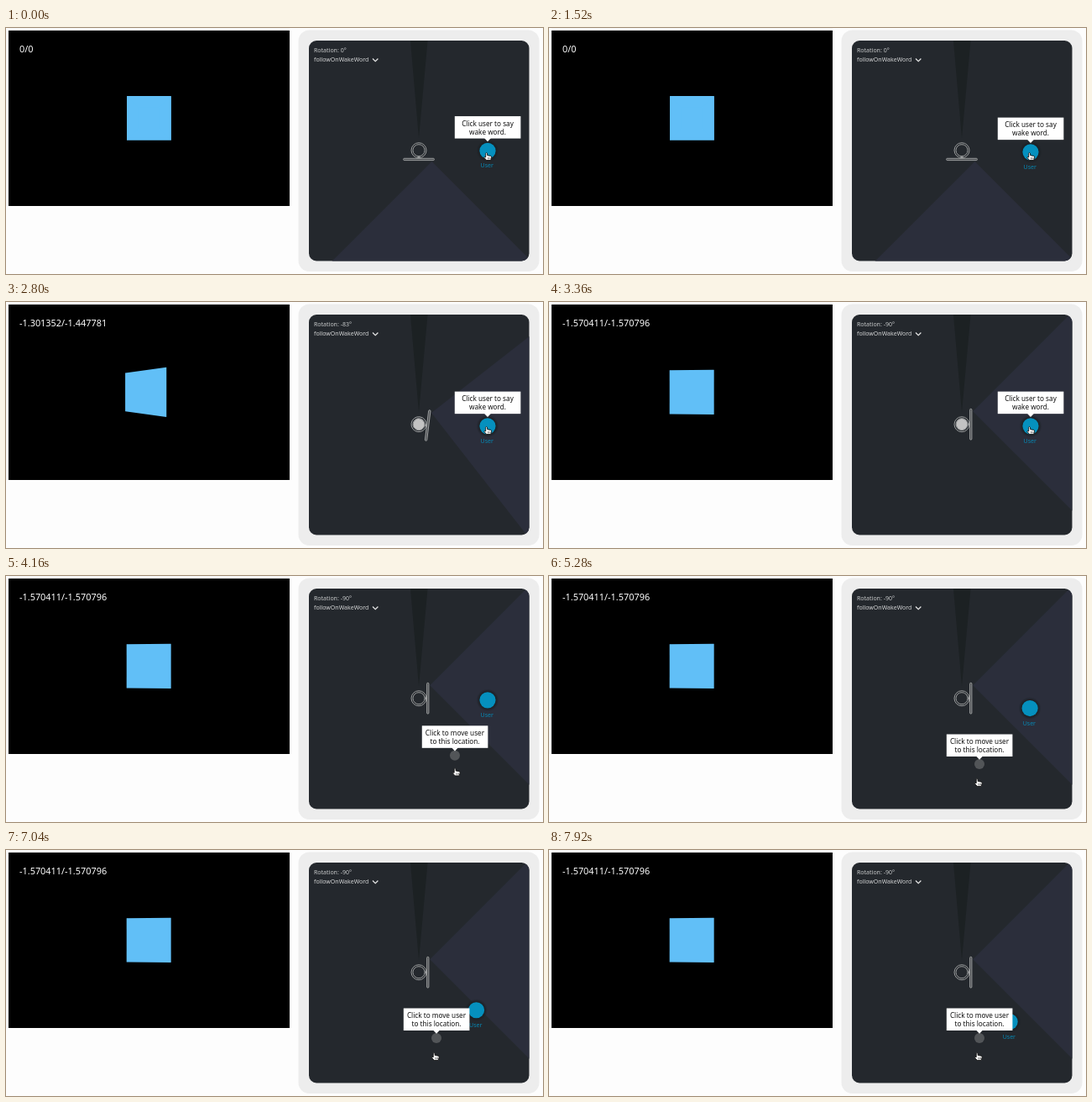
Write an HTML page with a canvas that moves like this. It is 640x293 px and loops after 8 s.

```html
<!DOCTYPE html>
<html>
<head>
<meta charset="utf-8">
<style>
  html, body { margin: 0; width: 100%; height: 100%; overflow: hidden; background: #fdfdfd; }
  canvas { display: block; width: 640px; height: 293px; }
</style>
</head>
<body>
<canvas id="stage"></canvas>
<script>
const LOOP = 8000;
const ROBOT = { x: 492, y: 145.7 };
const TURN = { start: 2015, speed: 0.00184196, lag: 79.5, end: Math.PI / 2 };
const ORBIT_RADIUS = 82;

const canvas = document.getElementById('stage');
const ctx = canvas.getContext('2d');
const ratio = window.devicePixelRatio || 1;
canvas.width = 640 * ratio;
canvas.height = 293 * ratio;

const clamp = (v, lo, hi) => Math.min(hi, Math.max(lo, v));

// Linear interpolation through [time, x, y] stops.
function along(stops, t) {
  if (t <= stops[0][0]) return { x: stops[0][1], y: stops[0][2] };
  for (let i = 1; i < stops.length; i++) {
    const [t0, x0, y0] = stops[i - 1], [t1, x1, y1] = stops[i];
    if (t <= t1) {
      const k = (t - t0) / (t1 - t0);
      return { x: x0 + (x1 - x0) * k, y: y0 + (y1 - y0) * k };
    }
  }
  const last = stops[stops.length - 1];
  return { x: last[1], y: last[2] };
}

function text(str, x, y, size, color, align = 'left') {
  ctx.font = `${size}px "Noto Sans", "Open Sans", sans-serif`;
  ctx.textAlign = align;
  ctx.fillStyle = color;
  ctx.fillText(str, x, y);
}

function roundRect(x, y, w, h, r) {
  ctx.beginPath();
  ctx.roundRect(x, y, w, h, r);
}

function polygon(points, color) {
  ctx.beginPath();
  points.forEach(([x, y]) => ctx.lineTo(x, y));
  ctx.closePath();
  ctx.fillStyle = color;
  ctx.fill();
}

function disc(x, y, r, color) {
  ctx.beginPath();
  ctx.arc(x, y, r, 0, 2 * Math.PI);
  ctx.fillStyle = color;
  ctx.fill();
}

// Robot heading, and the camera angle that follows it with a lag.
function headings(t) {
  const { start, speed, lag, end } = TURN;
  const elapsed = Math.max(0, t - start), duration = end / speed;
  const moving = Math.min(elapsed, duration);
  let gap = speed * lag * (1 - Math.exp(-moving / lag));
  if (elapsed > duration) gap = Math.max(0.000385, gap * Math.exp(-(elapsed - duration) / lag));
  const robot = speed * moving;
  return { robot, camera: robot - gap };
}

function drawView(angles) {
  ctx.fillStyle = '#000';
  ctx.fillRect(3, 3, 335, 209);

  const angle = Math.min(angles.camera, 1.55);
  const c = Math.cos(angle), s = Math.sin(angle);
  const project = ([x, y, z]) => {
    const scale = 52.6 / (3 - (z * c - x * s));
    return [170.4 + (x * c + z * s) * scale, 107.4 + y * scale];
  };
  const corners = [[-1, 1], [1, 1], [1, -1], [-1, -1]];
  corners.forEach(([x0, z0], i) => {
    const [x1, z1] = corners[(i + 1) % 4];
    polygon([[x0, -1, z0], [x1, -1, z1], [x1, 1, z1], [x0, 1, z0]].map(project), '#61bff7');
  });

  const show = v => v ? (-v).toFixed(6) : '0';
  text(`${show(angles.camera)}/${show(angles.robot)}`, 16, 29.3, 10.9, '#fff');
}

function drawRobot(angle, listening) {
  ctx.save();
  ctx.translate(ROBOT.x, ROBOT.y);
  ctx.rotate(-angle);
  ctx.strokeStyle = '#a5a7a8';
  ctx.lineWidth = 0.9;
  for (const r of [9, 7]) {
    ctx.beginPath();
    ctx.arc(0, 0, r, 0, 2 * Math.PI);
    ctx.stroke();
  }
  if (listening) disc(0, 0, 6.6, '#c3c3c3');
  ctx.fillStyle = '#a5a7a8';
  ctx.fillRect(-1.5, 7.5, 3, 2.3);
  roundRect(-18.4, 9.6, 36.8, 2.3, 1.1);
  ctx.fillStyle = '#4a4d50';
  ctx.fill();
  ctx.stroke();
  ctx.restore();
}

function drawTooltip(x, top, lines) {
  ctx.fillStyle = '#fff';
  ctx.fillRect(x - 39.2, top, 78.6, 26.5);
  polygon([[x - 4, top + 26], [x + 4, top + 26], [x, top + 30.3]], '#fff');
  lines.forEach((line, i) => text(line, x, top + 11.6 + i * 10.2, 8.2, '#111', 'center'));
}

function drawCursor({ x, y }) {
  ctx.save();
  ctx.translate(x, y);
  ctx.beginPath();
  ctx.moveTo(-2.8, -4);
  ctx.quadraticCurveTo(-1.9, -5.4, -1, -4);
  ctx.lineTo(-0.8, -1.5);
  ctx.lineTo(3.2, -0.8);
  ctx.quadraticCurveTo(4.4, -0.4, 4.2, 1);
  ctx.lineTo(3.2, 4.4);
  ctx.lineTo(-1.8, 4.4);
  ctx.lineTo(-4.6, 1.2);
  ctx.quadraticCurveTo(-4.8, -0.2, -2.8, 0.8);
  ctx.closePath();
  ctx.fillStyle = '#fff';
  ctx.strokeStyle = '#111';
  ctx.lineWidth = 0.9;
  ctx.fill();
  ctx.stroke();
  ctx.beginPath();
  for (const dx of [-0.2, 1.2, 2.6]) {
    ctx.moveTo(dx, 1);
    ctx.lineTo(dx, 3.2);
  }
  ctx.lineWidth = 0.5;
  ctx.stroke();
  ctx.restore();
}

function drawMap(t, angles) {
  roundRect(348.5, 2.5, 287, 287.5, 13);
  ctx.fillStyle = '#ededed';
  ctx.fill();

  ctx.save();
  roundRect(361, 15, 262.5, 262.5, 9);
  ctx.fillStyle = '#24282d';
  ctx.fill();
  ctx.clip();

  // Camera's 90 degree field of view
  ctx.save();
  ctx.translate(ROBOT.x, ROBOT.y);
  ctx.rotate(-angles.robot);
  polygon([[15.5, 13.2], [415.5, 413.2], [-384.5, 413.2]], '#2b2e3b');
  ctx.restore();
  polygon([[482, 15], [502.5, 15], [492, 131]], '#1c2123');

  text(`Rotation: ${Math.floor(-angles.robot * 180 / Math.PI)}°`, 367, 28.5, 7, '#c8cacb');
  text('followOnWakeWord', 367, 40, 7, '#d4d5d6');
  ctx.beginPath();
  ctx.moveTo(437, 36.5);
  ctx.lineTo(440.2, 39.7);
  ctx.lineTo(443.4, 36.5);
  ctx.strokeStyle = '#e6e6e6';
  ctx.lineWidth = 1.2;
  ctx.stroke();

  drawRobot(angles.robot, t >= 1560 && t < 3560);

  // The user walks a circle round the robot: a short step, then steadily
  const degrees = 0.4 + clamp((t - 1200) / 100, 0, 1) * 1.1 + Math.max(0, t - 4800) * 0.0142;
  const a = degrees * Math.PI / 180;
  const user = { x: ROBOT.x + ORBIT_RADIUS * Math.cos(a), y: ROBOT.y + ORBIT_RADIUS * Math.sin(a) };
  const halo = ctx.createRadialGradient(user.x, user.y, 9, user.x, user.y, 13.5);
  halo.addColorStop(0, '#191e22');
  halo.addColorStop(1, 'rgba(25,30,34,0)');
  disc(user.x, user.y, 13.5, halo);
  disc(user.x, user.y, 9.6, '#0590be');
  text('User', user.x - 0.8, user.y + 20.2, 7, '#0787b3', 'center');

  if (t < 4000) {
    drawTooltip(user.x, user.y - 41.2, ['Click user to say', 'wake word.']);
  } else {
    const spot = along([[3920, 574, 150], [4160, 535, 213.8], [4320, 529, 217], [4440, 529, 217], [4720, 513, 224]], t);
    disc(spot.x, spot.y, 6, '#525558');
    drawTooltip(spot.x, spot.y - 35.5, ['Click to move user', 'to this location.']);
  }
  drawCursor(along([[3920, 574.5, 153.2], [4160, 537, 233.5], [4320, 529.5, 238.5], [4440, 529.5, 238.5], [4720, 512, 246]], t));
  ctx.restore();
}

function frame(now) {
  const t = now % LOOP;
  const angles = headings(t);
  ctx.setTransform(ratio, 0, 0, ratio, 0, 0);
  ctx.fillStyle = '#fdfdfd';
  ctx.fillRect(0, 0, 640, 293);
  drawView(angles);
  drawMap(t, angles);
  requestAnimationFrame(time => frame(time - startTime));
}

const startTime = performance.now();
frame(0);
</script>
</body>
</html>
```
